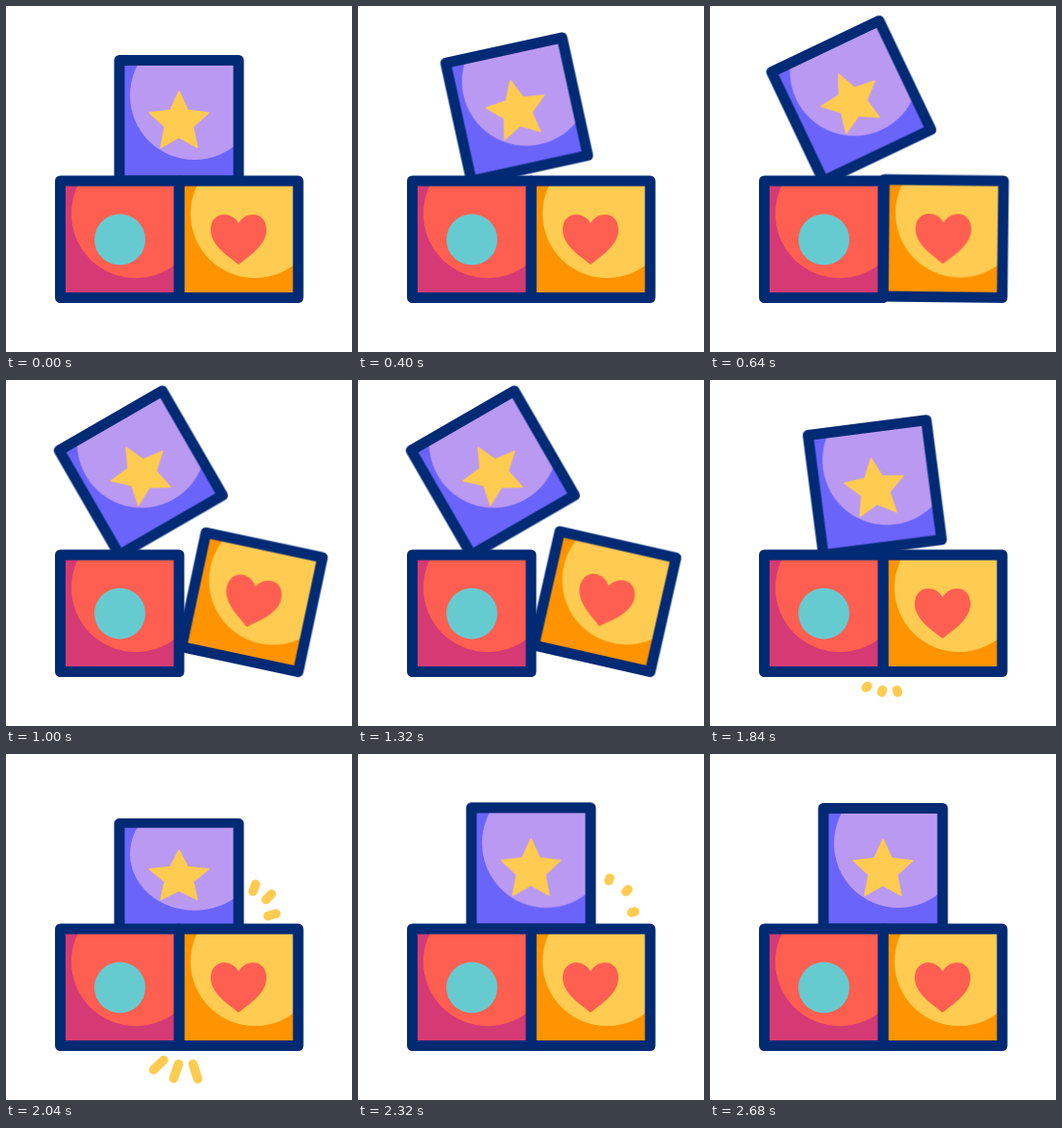
Animation, 360 px wide and 360 px high, one loop 3 s. Source, as an HTML page:

```html
<!DOCTYPE html>
<html lang="en">
<head>
<meta charset="utf-8">
<title>Toy blocks</title>
<style>
  html, body { margin: 0; width: 100%; height: 100%; overflow: hidden; background: #fff; }
  svg { display: block; width: 100vw; height: 100vh; }

  .frame { fill: none; stroke: #002a74; stroke-width: 11; stroke-linejoin: round; }
  .rays { fill: none; stroke: #ffcb50; stroke-width: 9.5; stroke-linecap: round; }
  .rays path { stroke-dasharray: 1 3; animation: ray 3s linear infinite; }
  .late path { animation-delay: -2850ms; }

  .tilt { transform-origin: 118px 182px; animation: tilt 3s linear infinite; }
  .squash { transform-origin: 180px 182px; animation: squash 3s ease-in-out infinite; }
  .lean { transform-origin: 304px 303.5px; animation: lean 3s linear infinite; }

  @keyframes tilt {
    0% { transform: rotate(0deg); }
    6.667% { transform: rotate(0deg); animation-timing-function: ease; }
    33.333% { transform: rotate(-30deg); }
    48% { transform: rotate(-30deg); animation-timing-function: cubic-bezier(.32, 0, .67, 0); }
    62.667%, 100% { transform: rotate(0deg); }
  }
  @keyframes lean {
    0% { transform: rotate(0deg); }
    20% { transform: rotate(0deg); animation-timing-function: ease; }
    40% { transform: rotate(13deg); }
    41.333% { transform: rotate(13deg); animation-timing-function: cubic-bezier(.11, 0, .5, 0); }
    61.333%, 100% { transform: rotate(0deg); }
  }
  @keyframes squash {
    0%, 62.667% { transform: scaleY(1); }
    67.5% { transform: scaleY(.875); }
    73.333% { transform: scaleY(1.046); }
    80% { transform: scaleY(.985); }
    88.667%, 100% { transform: scaleY(1); }
  }
  /* each ray grows from its base, then its base catches up with the tip */
  @keyframes ray {
    0%, 60.666% { opacity: 0; stroke-dashoffset: 1; }
    60.667% { opacity: 1; stroke-dashoffset: 1; }
    65%, 68.667% { opacity: 1; stroke-dashoffset: 0; }
    73.333% { opacity: 1; stroke-dashoffset: -1; }
    73.334%, 100% { opacity: 0; stroke-dashoffset: -1; }
  }
</style>
</head>
<body>
<svg viewBox="0 0 360 360">
  <defs>
    <clipPath id="topClip"><rect x="118" y="56.5" width="124" height="125.5"/></clipPath>
    <clipPath id="leftClip"><rect x="56.5" y="182" width="123.5" height="121.5"/></clipPath>
    <clipPath id="rightClip"><rect x="180" y="182" width="124" height="121.5"/></clipPath>
  </defs>

  <g class="rays">
    <path pathLength="1" d="M164 318.5L153.500 328.5"/>
    <path pathLength="1" d="M179.500 322.500L174.500 337.500"/>
    <path pathLength="1" d="M194.500 322.500L199.500 338"/>
  </g>
  <g class="rays late">
    <path pathLength="1" d="M257 143L262 129"/>
    <path pathLength="1" d="M270.500 151.500L281 141"/>
    <path pathLength="1" d="M272.500 168.500L288 164"/>
  </g>

  <g class="tilt">
    <g class="squash">
      <g clip-path="url(#topClip)">
        <rect x="118" y="56.5" width="124" height="125.5" fill="#6a64fa"/>
        <circle cx="196" cy="93" r="67" fill="#ba99f2"/>
      </g>
      <path id="star" fill="#ffcb50" stroke="#ffcb50" stroke-width="1.5" stroke-linejoin="round"/>
      <rect class="frame" x="118" y="56.5" width="124" height="125.5"/>
    </g>
  </g>

  <g class="lean">
    <g clip-path="url(#rightClip)">
      <rect x="180" y="182" width="124" height="121.5" fill="#ff9300"/>
      <circle cx="259" cy="216" r="67" fill="#ffcb50"/>
    </g>
    <path fill="#ff5f50" d="M242 269C234 262 213 250 213 233C213 223 219 217 227 217C234 217 239 221 242 226C245 221 250 217 257 217C265 217 271 223 271 233C271 250 250 262 242 269Z"/>
    <rect class="frame" x="180" y="182" width="124" height="121.5"/>
  </g>

  <g clip-path="url(#leftClip)">
    <rect x="56.5" y="182" width="123.5" height="121.5" fill="#d63a75"/>
    <circle cx="135" cy="216" r="67" fill="#ff5f50"/>
  </g>
  <circle cx="118.5" cy="243" r="26.5" fill="#66cbd1"/>
  <rect class="frame" x="56.5" y="182" width="123.5" height="121.5"/>
</svg>
<script>
  const points = Array.from({ length: 10 }, (_, i) => {
    const r = i % 2 ? 15.5 : 32.3;
    const a = i * Math.PI / 5;
    return `${180 + r * Math.sin(a)} ${121 - r * Math.cos(a)}`;
  });
  document.getElementById("star").setAttribute("d", `M${points.join("L")}Z`);
</script>
</body>
</html>
```
